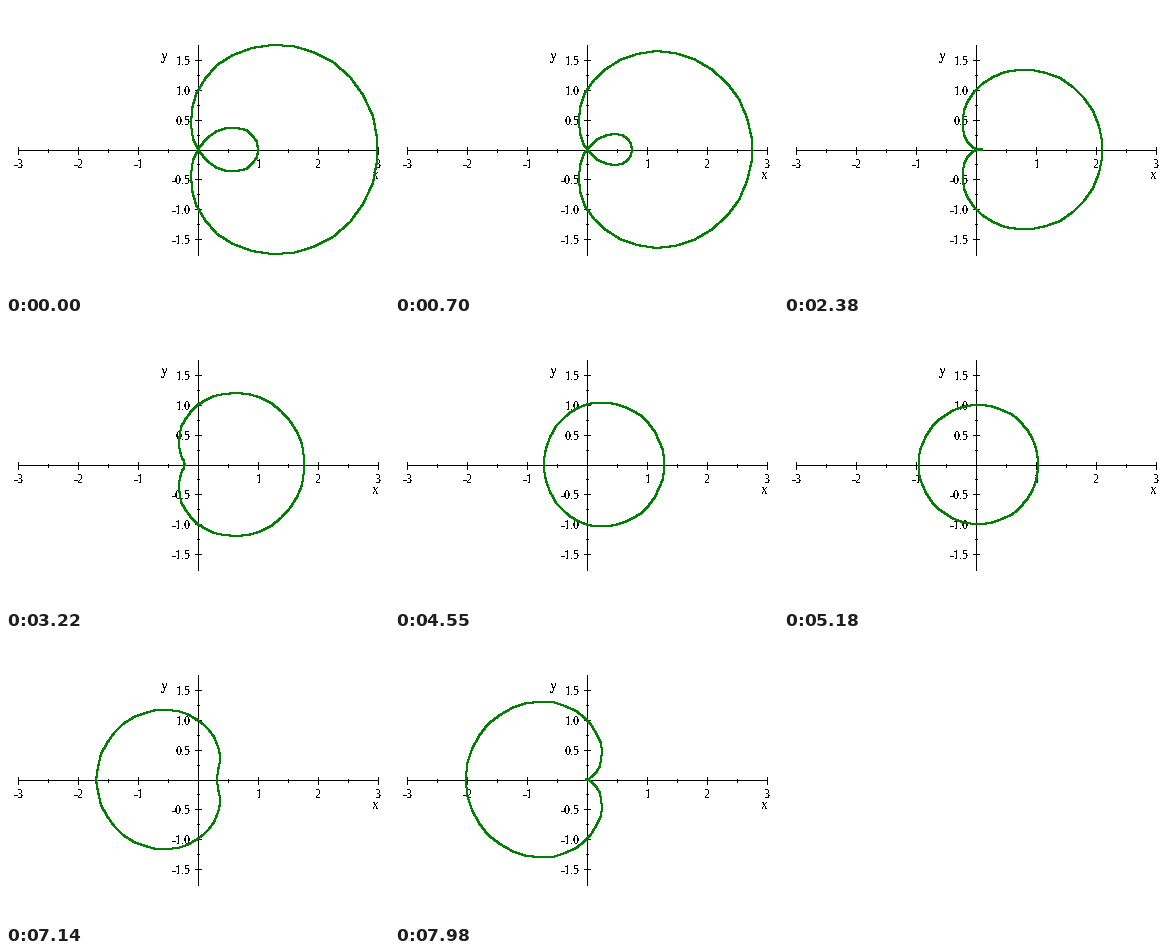
Write a matplotlib script that moves like this. It is 383 by 287 pixels and loops after 8000 ms.

```python
import numpy as np
import matplotlib.pyplot as plt
from matplotlib.animation import FuncAnimation

WIDTH, HEIGHT, DPI = 383, 287, 64
PX = 72 / DPI                      # points per pixel
X0, Y0 = 192, 144                  # pixel of the origin
SX, SY = 60, 59.65                 # pixels per unit
LOOP_MS, TICK_MS = 8000, 10
THETA = np.linspace(-np.pi, np.pi, 50)
GREEN = (0, 128, 0, 255)

plt.rcParams["text.antialiased"] = False
plt.rcParams["text.hinting"] = "default"
plt.rcParams["text.hinting_factor"] = 1

fig = plt.figure(figsize=(WIDTH / DPI, HEIGHT / DPI), dpi=DPI, facecolor="white")
ax = fig.add_axes([0, 0, 1, 1])
ax.axis("off")


def stroke(xs, ys):
    ax.plot(xs, ys, color="black", lw=PX, antialiased=False,
            solid_capstyle="butt", snap=False)


def label(x, y, text, size=12, ha="center"):
    ax.text(x, y, text, family="Liberation Serif", size=size * PX,
            ha=ha, va="baseline", color="black")


def draw_axes():
    stroke([12, 373], [Y0 + 0.5] * 2)
    stroke([X0 + 0.5] * 2, [39, 250])
    for i in range(-6, 7):
        if i == 0:
            continue
        major = i % 2 == 0
        reach = 3 if major else 1
        x = X0 + SX * i / 2 + 0.5
        stroke([x, x], [Y0 - reach, Y0 + reach + 2])
        y = np.floor(Y0 - SY * i / 4) + 0.5
        stroke([X0 - reach, X0 + reach + 1], [y, y])
        if major:
            label(x, 162, str(i // 2))
            label(184.5, y + 4.5, f"{i / 4:.1f}", ha="right")
    label(369, 173, "x", 15)
    label(158, 54, "y", 15)


def step_at(ms):
    """Steps last 210 ms, but every sixteenth one lasts 280 ms."""
    block, rest = divmod(ms, 3430)
    return 16 * block + max(0, (rest - 70) // 210)


def limacon(c):
    r = 1 + c * np.cos(THETA)
    x = np.floor(X0 + 0.6 + SX * r * np.cos(THETA))
    y = np.floor(Y0 - SY * r * np.sin(THETA))
    return x, y


def trace(xs, ys):
    """Draw a polyline with a square pen two pixels wide."""
    knots = np.arange(len(xs))
    at = np.linspace(0, len(xs) - 1, 4000)
    col = np.rint(np.interp(at, knots, xs)).astype(int)
    row = np.rint(np.interp(at, knots, ys)).astype(int)
    image = np.zeros((HEIGHT, WIDTH, 4), np.uint8)
    for dy in (0, 1):
        for dx in (0, 1):
            image[row - dy, col - dx] = GREEN
    return image


draw_axes()
curve = ax.imshow(trace(*limacon(2)), extent=(0, WIDTH, HEIGHT, 0),
                  interpolation="nearest", aspect="auto", zorder=5)
ax.set(xlim=(0, WIDTH), ylim=(HEIGHT, 0))


def update(frame):
    c = 2 - 4 * step_at(frame * TICK_MS) / 49
    curve.set_data(trace(*limacon(c)))
    return curve,


anim = FuncAnimation(fig, update, frames=LOOP_MS // TICK_MS, interval=TICK_MS,
                     repeat=True, repeat_delay=0, blit=False)
plt.show()
```
